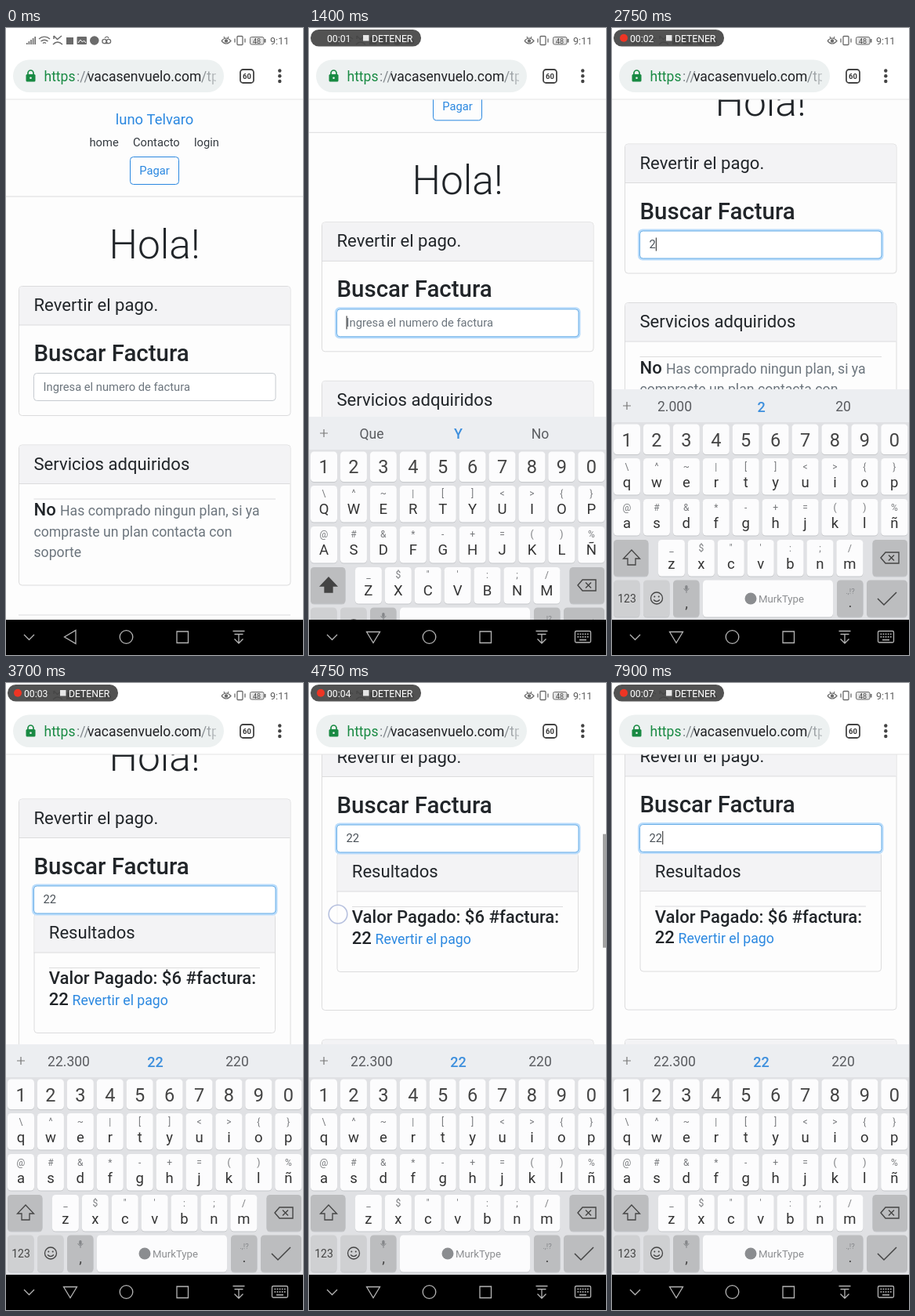
An HTML page with a canvas for the animation above (8000 ms loop, 379x800 px).

```html
<!DOCTYPE html>
<html lang="es">
<head>
<meta charset="utf-8">
<style>
html, body { margin: 0; width: 100%; height: 100%; overflow: hidden; background: #fff; }
canvas { display: block; width: 379px; height: 800px; }
</style>
</head>
<body>
<canvas id="stage"></canvas>
<script>
const W = 379, H = 800, LOOP = 8000, TOP = 91, NAV = 755, KB = 461;
const BLUE = '#2b88e0', INK = '#212529', MUTED = '#6c757d', LINE = '#dcdcdd';
const canvas = document.getElementById('stage');
const dpr = window.devicePixelRatio || 1;
canvas.width = W * dpr;
canvas.height = H * dpr;
const c = canvas.getContext('2d');

const ramp = (t, a, b) => Math.min(1, Math.max(0, (t - a) / (b - a)));
const easeOut = p => 1 - (1 - p) ** 2;
const within = (t, spans) => spans.some(([a, b]) => t >= a && t < b);

function text(s, x, y, size, color = INK, weight = 400, align = 'left') {
  c.font = `${weight} ${size}px Roboto, sans-serif`;
  c.fillStyle = color;
  c.textAlign = align;
  c.fillText(s, x, y);
}
const mid = (s, x, y, size, color, weight) => text(s, x, y, size, color, weight, 'center');

function box(x, y, w, h, r, fill, stroke, lw = 1) {
  c.beginPath();
  c.roundRect(x, y, w, h, r);
  paint(fill, stroke, lw);
}
function disc(x, y, r, fill, stroke, lw = 1) {
  c.beginPath();
  c.arc(x, y, r, 0, 7);
  paint(fill, stroke, lw);
}
function path(d, stroke, lw = 1.3, fill) {
  const p = new Path2D(d);
  if (fill) { c.fillStyle = fill; c.fill(p); }
  if (stroke) { c.strokeStyle = stroke; c.lineWidth = lw; c.stroke(p); }
}
function paint(fill, stroke, lw) {
  if (fill) { c.fillStyle = fill; c.fill(); }
  if (stroke) { c.strokeStyle = stroke; c.lineWidth = lw; c.stroke(); }
}
function rule(x, y, w) {
  c.fillStyle = LINE;
  c.fillRect(x, y, w, 1);
}

function card(x, y, w, h, title, pad) {
  box(x + .5, y + .5, w, h, 4, '#fdfdfd', LINE);
  box(x + 1, y + 1, w - 1, 49, [3, 3, 0, 0], '#f3f3f5');
  rule(x, y + 49.5, w);
  text(title, x + pad, y + 32, 22.08);
}

function input(t, typed, caret) {
  const focus = ramp(t, 1050, 1200);
  if (focus) {
    c.globalAlpha = focus;
    box(33, 438, 313.5, 40, 6, '#b9dcfb');
    c.globalAlpha = 1;
  }
  box(35.5, 440.5, 308.5, 35, 4, '#fff', focus > .5 ? '#69ade6' : '#c6cbd0');
  text(typed || 'Ingresa el numero de factura', 47.5, 462.5, 14.72, typed ? '#495057' : MUTED);
  if (caret) {
    c.fillStyle = '#444';
    c.fillRect(47.5 + typed.length * 8.3, 449, 1.2, 17);
  }
}

function page(t, scroll, bottom) {
  const typed = t < 2650 ? '' : t < 2850 ? '2' : '22';
  const results = t >= 3000, grow = results ? 182.5 : 0;
  const caret = within(t, [[1150, 1650], [2150, 3350], [3850, 4350], [4850, 5350],
    [5850, 6350], [6900, 7400], [7900, 8000]]);
  c.save();
  c.beginPath();
  c.rect(0, TOP, W, bottom - TOP);
  c.clip();
  c.translate(0, -scroll);

  mid('luno Telvaro', 189.5, 122.5, 18.4, BLUE);
  text('home', 106.5, 150.5, 14.72, '#343a40');
  text('Contacto', 162, 150.5, 14.72, '#343a40');
  text('login', 240, 150.5, 14.72, '#343a40');
  box(158.5, 164.5, 62, 35, 4, null, BLUE);
  mid('Pagar', 189.5, 187, 14.72, BLUE);
  rule(0, 214.5, W);
  mid('Hola!', 189.5, 293.5, 51.5, INK, 300);

  card(16, 329, 346.5, 165 + grow, 'Revertir el pago.', 19.5);
  text('Buscar Factura', 35.5, 425, 29.44, INK, 500);
  if (results) {
    card(35.5, 475.5, 307.5, 152, 'Resultados', 19.3);
    rule(55, 544.5, 269);
    text('Valor Pagado: $6 #factura:', 54.8, 565.5, 22.08, INK, 500);
    text('22', 54.8, 592, 22.08, INK, 500);
    text('Revertir el pago', 84.5, 592, 17.66, BLUE);
  }
  input(t, typed, caret);

  c.translate(0, grow);
  card(16, 531.5, 346.5, 179, 'Servicios adquiridos', 19.5);
  rule(35.5, 600.5, 308.5);
  text('No', 35.5, 622, 22.08, INK, 500);
  text('Has comprado ningun plan, si ya', 69, 622, 17.66, MUTED);
  text('compraste un plan contacta con', 35.5, 648.5, 17.66, MUTED);
  text('soporte', 35.5, 675, 17.66, MUTED);
  rule(16, 748.5, 347);
  c.restore();

  const bar = ramp(t, 4250, 4350) * (1 - ramp(t, 5450, 5700));
  if (bar) {
    c.globalAlpha = bar;
    box(375, TOP + scroll * .392, 4, 145, 0, '#a2a2a2');
    c.globalAlpha = 1;
  }
}

function toolbar() {
  c.fillStyle = '#fff';
  c.fillRect(0, 0, W, TOP);
  c.fillStyle = '#e4e4e4';
  c.fillRect(0, 90.5, W, 1);
  box(9, 40.5, 269, 41.5, 20.7, '#edf1f1');
  const green = '#198a43';
  path('M28 60V57.5a3.5 3.5 0 0 1 7 0V60', green, 1.7);
  box(25.5, 59, 12, 9.5, 1.5, green);
  disc(31.5, 63.7, 1.3, '#edf1f1');
  text('https', 48.5, 67.5, 17.5, green);
  text('://', 90, 67.5, 17.5, '#80868b');
  text('vacasenvuelo.com', 104, 67.5, 17.5, '#202124');
  c.save();
  c.beginPath();
  c.rect(245, 45, 23, 32);
  c.clip();
  const fade = c.createLinearGradient(248, 0, 270, 0);
  fade.addColorStop(0, '#777d81');
  fade.addColorStop(1, '#c9cdcf');
  text('/tpa', 249, 67.5, 17.5, fade);
  c.restore();
  box(299, 53, 17, 17, 3.5, null, '#444', 1.8);
  mid('60', 307.5, 65, 9.5, '#333', 700);
  for (const y of [54.5, 61.3, 68]) disc(349.3, y, 2.2, '#444');
}

function status() {
  const g = '#6b6b6b';
  c.fillStyle = g;
  for (let i = 0; i < 5; i++) c.fillRect(26 + i * 2.6, 19 - i * 2, 1.6, 2 + i * 2);
  path('M42 14a10 10 0 0 1 14 0M44.5 17a6.5 6.5 0 0 1 9 0M47 19.5a3 3 0 0 1 4 0', g, 1.4);
  path('M61 10l4.5 4.5L71 10M61 10v4M60 21q5.5-6 12 0', g, 1.5);
  box(77, 12, 9, 9, 0, g);
  box(90.5, 11, 12.5, 10, 1, g);
  path('M92 19l3-4 2.5 3 2-2 2.5 3', '#fff', 1);
  disc(112.8, 16, 5.8, g);
  disc(125.5, 17, 2.6, null, g, 1.3);
  disc(131, 17, 2.6, null, g, 1.3);
  path('M125.5 19.6H131M126 13q3-4 5 0', g, 1.2);

  path('M275 16.5q6-7 12 0q-6 7-12 0M278 11l1 2M284 11l-1 2', g, 1.2);
  disc(281, 16.5, 2.2, g);
  box(295, 10.5, 7, 11, 1, null, g, 1.3);
  path('M292 13.5v5M305 13.5v5', g, 1.3);
  box(311.5, 11.5, 17.5, 9.5, 2, '#e4e4e4', g);
  box(329.5, 14, 2, 4.5, 0, g);
  mid('48', 320, 19.5, 9, '#444');
  text('9:11', 337, 20.7, 12.6, '#5c5c5c');
}

function recorder(t) {
  const shown = ramp(t, 100, 250);
  if (t < 150) return;
  const ticks = [1150, 2150, 3150, 4200, 5200, 6200, 7200];
  const sec = ticks.filter(s => t >= s).length;
  const since = t - (sec ? ticks[sec - 1] : 150);
  c.globalAlpha = shown;
  box(2, 2, 141, 21.5, 10.5, 'rgba(68,68,68,.92)');
  if (since >= 500) disc(15, 12.7, 5, '#ee3524');
  text('00:0' + sec, 23, 17.5, 12.2, '#fff');
  box(69, 9, 7.5, 7.5, 0, '#e6e6e6');
  text('DETENER', 80, 17.5, 12.2, '#fff');
  c.globalAlpha = 1;
}

function key(x, y, w, h, fill = '#fcfcfd') {
  box(x, y + 1, w, h, 4.5, '#c6c8cb');
  box(x, y, w, h, 4.5, fill);
}

function keyboard(t, top) {
  if (top >= NAV) return;
  const caps = t < 2650, grey = '#bcbdbf', pale = '#cfd0d2', ink = '#444';
  c.save();
  c.translate(0, top - KB);
  c.fillStyle = '#e0e1e4';
  c.fillRect(0, KB, W, 294);
  c.fillStyle = '#eceef1';
  c.fillRect(0, KB, W, 42);
  path('M14 482h10M19 477v10', '#777', 1.2);
  const words = caps ? ['Que', 'Y', 'No'] : t < 2850 ? ['2.000', '2', '20'] : ['22.300', '22', '220'];
  mid(words[0], 80, 489, 17.5, '#5a5c60');
  mid(words[1], 190.5, 489.5, 18, '#3d8fdd', 500);
  mid(words[2], 295, 489, 17.5, '#5a5c60');

  const at = i => 19 + i * 37.92;
  [...'1234567890'].forEach((d, i) => {
    const down = i === 1 && within(t, [[2600, 2680], [2800, 2880]]);
    key(at(i) - 17, 505.5, 34, 38.5, down ? pale : undefined);
    mid(d, at(i), 533.5, 23.5, ink);
  });
  const rows = [
    ['QWERTYUIOP', '\\^~|[]<>{}', 0, 549],
    ['ASDFGHJKLÑ', '@#&*-+=()%', 0, 601],
    ['ZXCVBNM', '_$"\':;/', 1.5, 653]
  ];
  for (const [letters, marks, shift, y] of rows) {
    [...letters].forEach((l, i) => {
      const x = at(i + shift);
      key(x - 17, y, 34, 46.5);
      mid(marks[i], x, y + 14.5, 12, '#77797c');
      mid(caps ? l : l.toLowerCase(), x, y + 36.5, 18.5, '#333');
    });
  }
  key(2, 653, 44.5, 46.5, grey);
  path('M25 666l10.5 11h-5.5v8h-10v-8h-5.5z', ink, 1.3, caps ? ink : null);
  key(332.5, 653, 44.5, 46.5, grey);
  path('M343 676l6-7h17v14h-17zM353 672.5l7 7M360 672.5l-7 7', ink, 1.4);

  key(2, 704.5, 33.5, 47, pale);
  mid('123', 19, 733, 14, ink);
  key(40, 704.5, 33.5, 47, pale);
  disc(57, 727.5, 7.5, null, ink, 1.3);
  disc(54.3, 725.5, 1, ink);
  disc(59.7, 725.5, 1, ink);
  path('M53 729.5q4 4 8 0', ink, 1.2);
  key(78, 704.5, 33.5, 47, grey);
  box(93.2, 711, 3.4, 6, 1.7, '#85878a');
  path('M91.5 715q3.4 6 6.8 0M95 718v3', '#85878a', 1);
  mid(',', 95, 740, 19, ink);
  key(116, 704.5, 166, 47);
  disc(177, 728, 7.5, '#8b8d90');
  text('MurkType', 187, 732.5, 13.2, '#8b8d90');
  key(287, 704.5, 33.5, 47, grey);
  mid('.,!?', 304, 722, 9.5, '#85878a');
  mid('.', 304, 739, 19, ink);
  key(325, 704.5, 52, 47, grey);
  path('M339 728l8 8 16-16', ink, 1.5);
  c.restore();
}

function navbar(open) {
  const g = '#b4b4b4';
  c.fillStyle = '#000';
  c.fillRect(0, NAV, W, H - NAV);
  path('M23 774l6.5 6.5 6.5-6.5', g);
  path(open ? 'M73.5 770.5h17l-8.5 14z' : 'M89 768.5v17l-14.5-8.5z', g);
  disc(153.5, 777, 8.3, null, g, 1.3);
  box(218, 770, 14.5, 14.5, 0, null, g, 1.3);
  path('M289.5 769.5h15M291.5 773.5h11M297 773.5v11M291.5 779.5l5.5 5.5 5.5-5.5', g);
  if (!open) return;
  box(339.5, 769.5, 20, 14.5, 1.5, null, g, 1.3);
  c.fillStyle = g;
  for (let i = 0; i < 10; i++) c.fillRect(342.5 + i % 5 * 3.1, 772.5 + (i / 5 | 0) * 3.5, 1.7, 1.7);
  c.fillRect(345, 780, 9, 1.5);
}

function touch(t, drag) {
  const taps = [[1000, 1100, 150, 458], [2600, 2680, 58, 526], [2800, 2880, 58, 526],
    [4200, 5200, 37 + 4 * (1 - drag), 295 + 90 * (1 - drag)]];
  for (const [a, b, x, y] of taps) {
    if (t >= a && t < b) disc(x, y, 11.8, 'rgba(255,255,255,.6)', 'rgba(165,178,215,.8)', 1.6);
  }
}

function draw(now) {
  const t = now % LOOP;
  const drag = easeOut(ramp(t, 4220, 4720));
  const scroll = 181.5 * easeOut(ramp(t, 1370, 1490)) + 78 * drag + .5 * ramp(t, 4800, 5000);
  const top = NAV - (NAV - KB) * easeOut(ramp(t, 1270, 1470));
  c.setTransform(dpr, 0, 0, dpr, 0, 0);
  c.fillStyle = '#fdfdfd';
  c.fillRect(0, 0, W, H);
  page(t, scroll, top);
  toolbar();
  status();
  recorder(t);
  keyboard(t, top);
  navbar(t >= 1200);
  touch(t, drag);
}

const start = performance.now();
function tick() {
  draw(performance.now() - start);
  requestAnimationFrame(tick);
}
tick();
</script>
</body>
</html>
```
